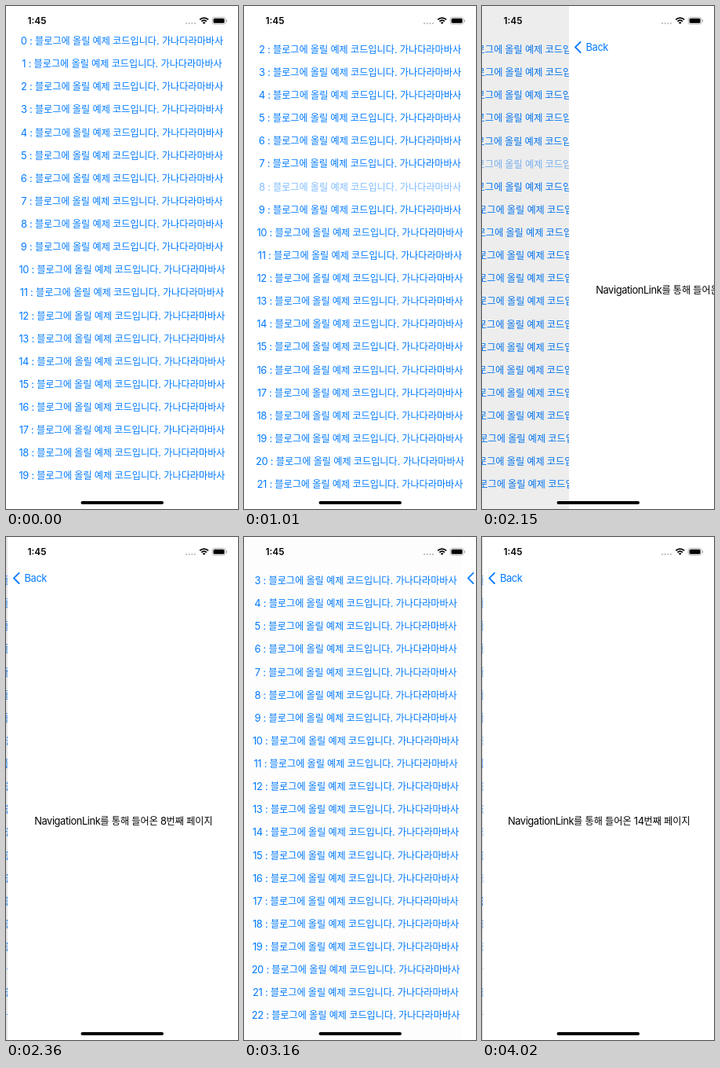
These frames come from a looping animation (296x640 px, 4.11 s). An HTML page with a canvas:

```html
<!DOCTYPE html>
<html lang="ko">
<head>
<meta charset="utf-8">
<title>List navigation</title>
<style>
  html, body { margin: 0; width: 100%; height: 100%; overflow: hidden; background: #fff; }
  canvas { display: block; width: 296px; height: 640px; }
</style>
</head>
<body>
<canvas id="stage"></canvas>
<script>
const W = 296, H = 640, LOOP = 4110;
const BLUE = '#007aff';
const ROW = 29.13, FIRST = 49, SCROLL = 76.4, TOP = 35.7, BOTTOM = 614;
const LATIN = '12.9px Inter, "Noto Sans", sans-serif';
const HANGUL = '12.17px "Noto Sans CJK KR", "Noto Sans CJK", sans-serif';

// The screen refreshes only at these moments.
const TICKS = [0, 790, 900, 1010, 1120, 1230, 1350, 1930, 2040, 2150, 2260, 2360,
  2490, 2820, 2930, 3040, 3160, 3270, 3380, 3570, 3680, 3790, 3900, 4020];

const canvas = document.getElementById('stage');
const ctx = canvas.getContext('2d');
const ratio = window.devicePixelRatio || 1;
canvas.width = W * ratio;
canvas.height = H * ratio;

const clamp = v => Math.min(1, Math.max(0, v));

// Critically damped spring from 0 to 1.
function spring(ms) {
  const x = Math.max(0, ms) * 0.0238;
  return x > 10 ? 1 : 1 - (1 + x) * Math.exp(-x);
}

// Opacity of a control after a touch: dimmed, then fading back.
function pressed(ms) {
  return ms < 0 ? 1 : 0.2 + 0.8 * clamp((ms - 130) / 240);
}

function setFont(run) {
  const hangul = /[가-힣]/.test(run);
  ctx.font = hangul ? HANGUL : LATIN;
  ctx.letterSpacing = hangul ? '0px' : '-0.42px';
  ctx.wordSpacing = hangul ? '0px' : '0.4px';
}

// Mixed Latin and Hangul text, centred on x unless align is 'left'.
function label(text, x, y, align) {
  const runs = text.match(/[가-힣]+|[^가-힣]+/g);
  const widths = runs.map(run => {
    setFont(run);
    return ctx.measureText(run).width;
  });
  if (align !== 'left') x -= widths.reduce((a, b) => a + b) / 2;
  runs.forEach((run, i) => {
    setFont(run);
    ctx.fillText(run, x, y);
    x += widths[i];
  });
}

function pill(x, y, w, h, r, color) {
  ctx.fillStyle = color;
  ctx.beginPath();
  ctx.roundRect(x, y, w, h, r);
  ctx.fill();
}

function drawList(scroll, shift, row, alpha) {
  ctx.save();
  ctx.beginPath();
  ctx.rect(0, TOP, W, BOTTOM - TOP);
  ctx.clip();
  ctx.fillStyle = BLUE;
  for (let i = 0; i < 24; i++) {
    const y = FIRST + i * ROW - scroll;
    if (y < TOP - 5 || y > BOTTOM + 15) continue;
    ctx.globalAlpha = i === row ? alpha : 1;
    label(i + ' : 블로그에 올릴 예제 코드입니다. 가나다라마바사', W / 2 + shift, y);
  }
  ctx.restore();
}

function drawPage(x, number, alpha) {
  ctx.save();
  ctx.translate(x, 0);
  ctx.fillStyle = '#fff';
  ctx.fillRect(0, 0, W, H);
  ctx.fillStyle = '#000';
  label('NavigationLink를 통해 들어온 ' + number + '번째 페이지', W / 2, 366);

  ctx.globalAlpha = Math.pow(alpha, 0.6);
  ctx.strokeStyle = BLUE;
  ctx.lineWidth = 1.9;
  ctx.lineCap = ctx.lineJoin = 'round';
  ctx.beginPath();
  ctx.moveTo(14.6, 45.8);
  ctx.lineTo(8, 52.4);
  ctx.lineTo(14.6, 59);
  ctx.stroke();
  ctx.globalAlpha = alpha;
  ctx.fillStyle = BLUE;
  label('Back', 21.6, 57, 'left');
  ctx.restore();
}

function drawStatus() {
  ctx.fillStyle = '#000';
  ctx.font = '600 11.8px Inter, "Noto Sans", sans-serif';
  ctx.letterSpacing = ctx.wordSpacing = '0px';
  ctx.textAlign = 'center';
  ctx.fillText('1:45', 39.5, 23.1);
  ctx.textAlign = 'left';

  for (let i = 0; i < 4; i++) pill(229 + i * 3.6, 20.9, 2.3, 2.3, 1.15, '#bdbdbd');

  // Wi-Fi
  ctx.strokeStyle = '#000';
  ctx.lineCap = 'butt';
  ctx.lineWidth = 1.8;
  for (const r of [4.6, 7.7]) {
    ctx.beginPath();
    ctx.arc(252.7, 22.8, r, -Math.PI * 0.75, -Math.PI * 0.25);
    ctx.stroke();
  }
  ctx.fillStyle = '#000';
  ctx.beginPath();
  ctx.moveTo(252.7, 23);
  ctx.arc(252.7, 23, 2.7, -Math.PI * 0.75, -Math.PI * 0.25);
  ctx.fill();

  // Battery
  ctx.strokeStyle = '#a6a6a6';
  ctx.lineWidth = 0.8;
  ctx.beginPath();
  ctx.roundRect(263.2, 14.4, 16.8, 8.8, 2.6);
  ctx.stroke();
  pill(264.6, 15.8, 14, 6, 1.5, '#000');
  pill(281, 17.2, 1.1, 3.2, 0.6, '#a6a6a6');

  pill(95.5, 630, 105.5, 3.9, 1.95, '#000');
}

function draw(now) {
  const time = now % LOOP;
  const t = TICKS.filter(tick => tick <= time).pop();

  const scroll = SCROLL * (1 - Math.pow(1 - clamp((t - 850) / 400), 1.9));
  const second = t >= 3570;
  const row = second ? 14 : 8;
  const touch = second ? 3570 : t >= 1930 ? 1930 : 790;

  // 0 shows the list, 1 shows the page.
  let open = 0;
  if (second) open = spring(t - 3701);
  else if (t >= 3380) open = 0;
  else if (t >= 2820) open = 1 - spring(t - 2971);
  else if (t >= 2490) open = 1;
  else if (t >= 1930) open = spring(t - 2061);

  ctx.setTransform(ratio, 0, 0, ratio, 0, 0);
  ctx.fillStyle = '#fff';
  ctx.fillRect(0, 0, W, H);

  if (open < 1) drawList(scroll, -0.3 * W * open, row, pressed(t - touch));
  if (open > 0) {
    ctx.fillStyle = `rgba(0, 0, 0, ${0.11 * open})`;
    ctx.fillRect(0, 0, W, H);
    drawPage(W * (1 - open), row, second ? 1 : pressed(t - 2820));
  }
  drawStatus();
}

const start = performance.now();
function loop() {
  draw(performance.now() - start);
  requestAnimationFrame(loop);
}
loop();
</script>
</body>
</html>
```
